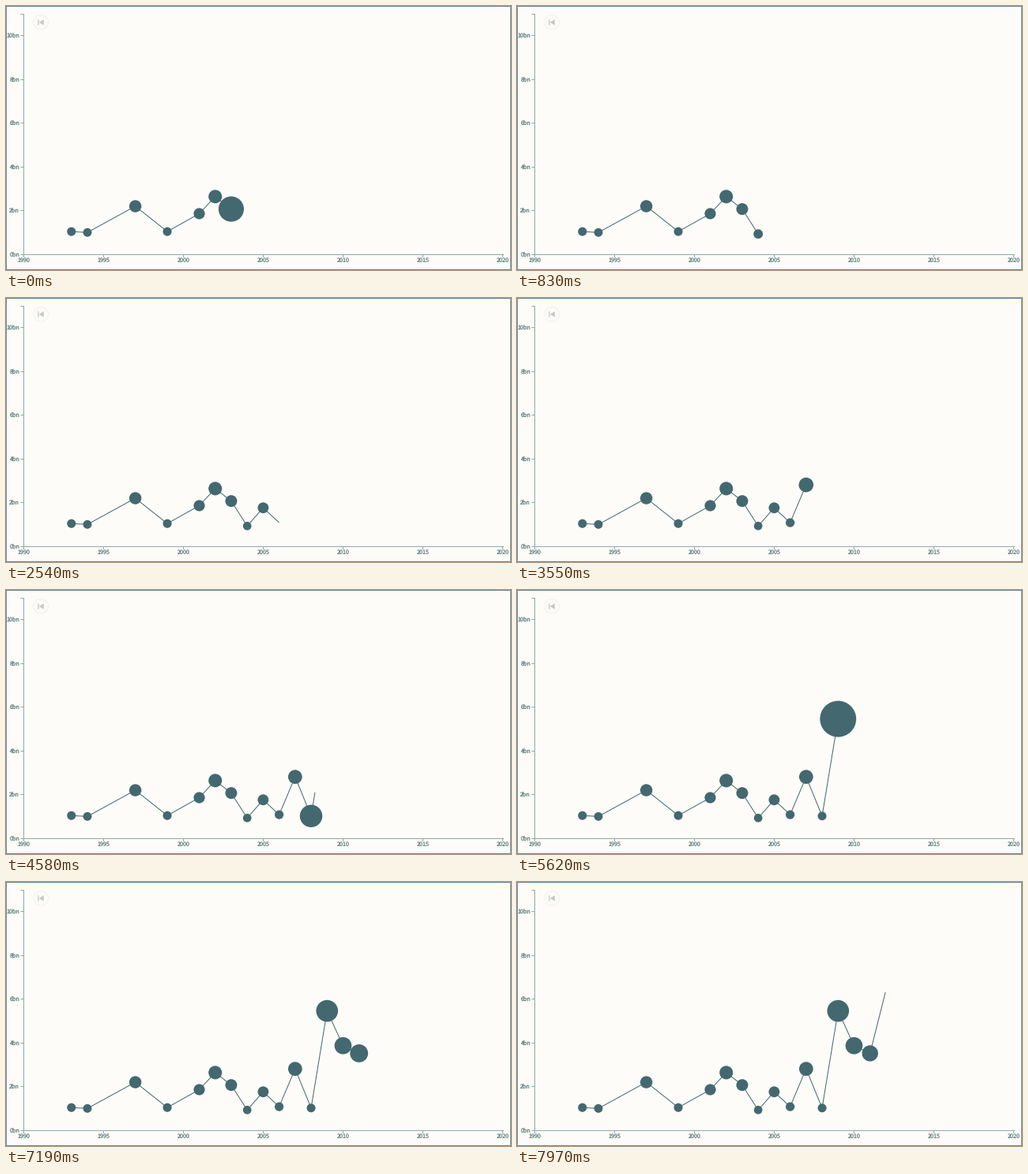
A matplotlib script for the animation above (8000 ms loop, 639x335 px).

```python
import numpy as np
import matplotlib.pyplot as plt
from matplotlib.animation import FuncAnimation
from matplotlib.patches import Circle, Polygon, Rectangle

plt.rcParams["text.hinting"] = "none"

W, H, DPI = 639, 335, 100
LOOP, TICK = 8000, 20
BG, TEAL, AXIS, TEXT = "#fdfcf8", "#43686f", "#90a8a8", "#5f7f80"

# value in bn for each year
SERIES = {
    1993: 1.04, 1994: 1.00, 1997: 2.20, 1999: 1.04, 2001: 1.86, 2002: 2.64,
    2003: 2.07, 2004: 0.93, 2005: 1.76, 2006: 1.08, 2007: 2.81, 2008: 1.02,
    2009: 5.46, 2010: 3.87, 2011: 3.52, 2012: 6.42,
}
START_YEAR, START, YEAR_MS = 2003, -174, 908.5
GROW, SETTLE, PEAK = 300, 72, 3.5


def px(width):
    return width * 72 / DPI


def sx(year):
    return 22.1 + (year - 1990) * 20.22


def sy(value):
    return 315.1 - value * 27.75


def pop(age):
    """Scale of a dot: grows past its size, then drops back to it."""
    return np.interp(age, [0, GROW, GROW + SETTLE], [0, PEAK, 1])


fig = plt.figure(figsize=(W / DPI, H / DPI), dpi=DPI, facecolor=BG)
ax = fig.add_axes([0, 0, 1, 1])
ax.set_xlim(0, W)
ax.set_ylim(H, 0)
ax.axis("off")


def rule(x0, y0, x1, y1):
    ax.plot([x0, x1], [y0, y1], color=AXIS, lw=px(1),
            solid_capstyle="butt", snap=False, zorder=1)


def label(x, y, text, ha):
    ax.text(x, y, text, ha=ha, va="center_baseline", color=TEXT,
            fontsize=px(7.2), family=["Noto Sans CJK JP", "DejaVu Sans"])


def draw_axes():
    rule(22.5, 10, 22.5, 315)
    rule(22, 315.5, 630, 315.5)
    rule(18.5, 10.5, 22.5, 10.5)
    for v in range(0, 11, 2):
        y = np.floor(sy(v)) + 0.5
        rule(18.5, y, 22.5, y)
        label(17.2, y - 1, f"{v}bn", "right")
    for year in range(1990, 2021, 5):
        x = np.floor(sx(year)) + 0.5
        rule(x, 315, x, 319)
        label(x, 321.6, str(year), "center")


def draw_button():
    ax.add_patch(Circle((44.2, 20.6), 9.3, fc="#fcfbf7", ec="#f2f2ed",
                        lw=px(1)))
    icon = dict(fc="#c3cbc6", lw=0, snap=False)
    ax.add_patch(Rectangle((40.2, 17), 1.3, 7.4, **icon))
    ax.add_patch(Polygon([(41.7, 20.7), (47.8, 17), (47.8, 24.4)], **icon))


ax.add_patch(Rectangle((0.5, 0.5), W - 1, H - 1, fill=False, snap=False,
                       ec="#6a8799", lw=px(1)))
draw_axes()
draw_button()

years = np.array(list(SERIES))
values = np.array(list(SERIES.values()))
xs, ys = sx(years), sy(values)
radii = 3.6 + 1.87 * values
arrivals = START + (years - START_YEAR) * YEAR_MS

line, = ax.plot([], [], color=TEAL, lw=px(1), solid_capstyle="butt",
                solid_joinstyle="round", zorder=3)
dots = [ax.add_patch(Circle(p, 0, fc=TEAL, lw=0, zorder=4))
        for p in zip(xs, ys)]


def update(i):
    t = (i + 0.5) * TICK
    done = arrivals <= t
    tip_x, tip_y = (np.interp(t, arrivals, c) for c in (xs, ys))
    line.set_data(np.append(xs[done], tip_x), np.append(ys[done], tip_y))
    for dot, r, at in zip(dots, radii, arrivals):
        dot.set_visible(at < t)
        dot.set_radius(r * pop(t - at))
    return [line, *dots]


anim = FuncAnimation(fig, update, frames=LOOP // TICK, interval=TICK,
                     repeat=True, repeat_delay=0)
plt.show()
```
